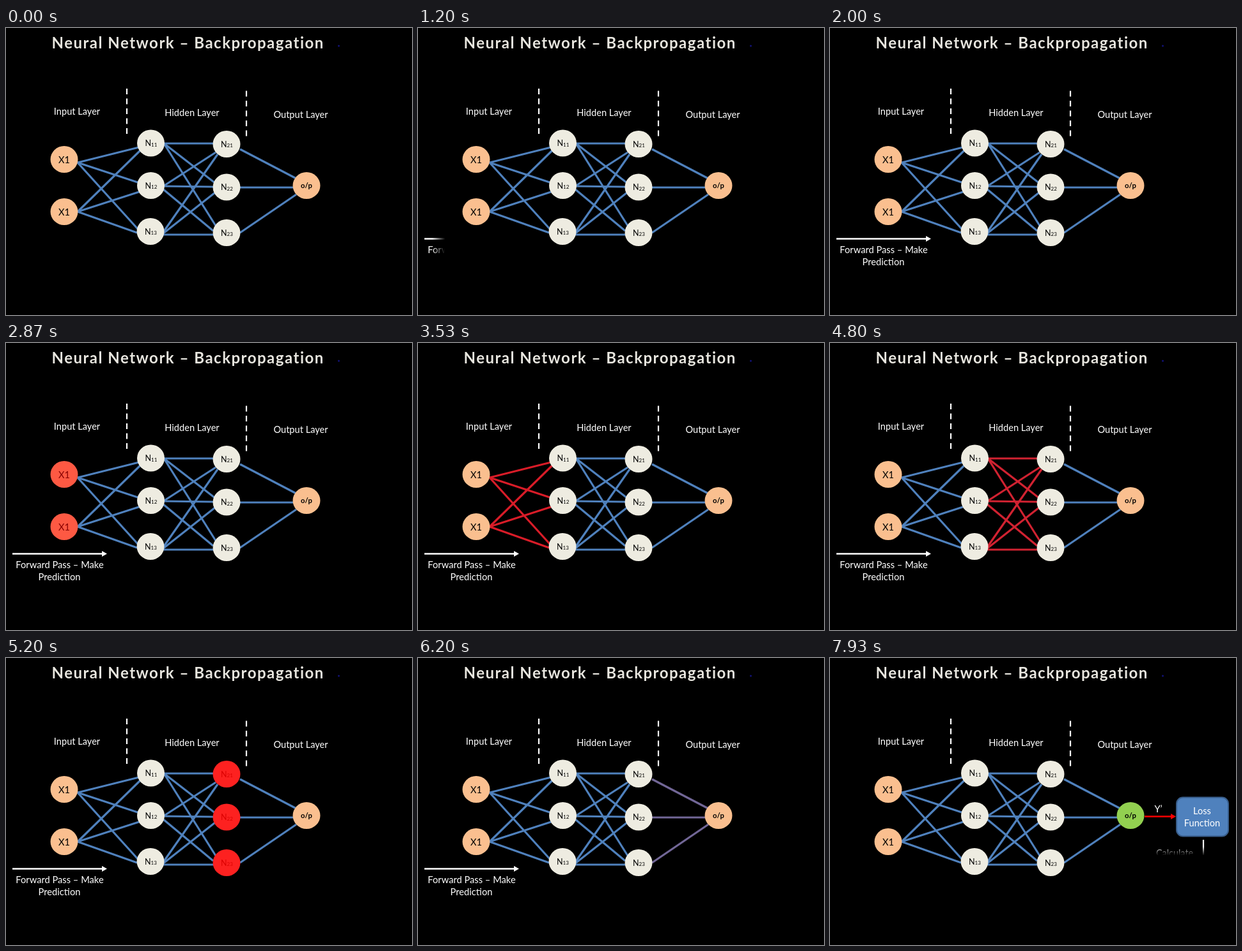
Recreate the animation shown at these times as an HTML page with a canvas. Size 635 px wide and 450 px high, loop 8 s.

```html
<!DOCTYPE html>
<html lang="en">
<head>
<meta charset="utf-8">
<title>Neural Network – Backpropagation</title>
<style>
html, body { margin: 0; width: 100%; height: 100%; overflow: hidden; background: #000; }
canvas { display: block; }
</style>
</head>
<body>
<canvas id="stage" width="635" height="450"></canvas>
<script>
const ctx = document.getElementById('stage').getContext('2d');
const LOOP = 8000, FPS = 15;
const FAMILY = 'Lato, Carlito, "Open Sans", sans-serif';

const BLUE = [79, 129, 189], RED = [255, 0, 0], BLACK = [0, 0, 0];
const ORANGE = [250, 191, 143], CREAM = [238, 236, 225], GREEN = [146, 208, 80];

// x1, y1, x2, y2 of each connection, by layer
const LINKS = [
  [[112, 211, 208, 187], [112, 211, 206, 242], [112, 211, 206, 315],
   [112, 288, 211, 191], [112, 288, 208, 257], [112, 288, 205, 321]],
  [[247, 181, 324, 181], [247, 181, 327, 243], [247, 181, 328, 310],
   [246, 248, 328, 195], [246, 248, 324, 249], [246, 253, 324, 318],
   [246, 320, 331, 198], [246, 322, 327, 258], [246, 324, 325, 324]],
  [[366, 190, 454, 236], [366, 250, 449, 250], [366, 321, 454, 261]]
];
const INPUTS = [[91, 206], [91, 288]];
const HIDDEN = [
  [[226.5, 180.5], [226.5, 247], [226, 319]],
  [[345, 182], [345, 249.5], [345, 321]]
];

const clamp = v => Math.max(0, Math.min(1, v));
const ramp = (t, start, dur) => clamp((t - start) / dur);
const pulse = (t, start) => 1 - Math.abs(2 * ramp(t, start, 500) - 1);
const mix = (a, b, k) => `rgb(${a.map((v, i) => Math.round(v + (b[i] - v) * k))})`;

function text(str, x, y, size, color = '#fff', weight = 400, align = 'center') {
  ctx.font = `${weight} ${size}px ${FAMILY}`;
  ctx.textAlign = align;
  ctx.fillStyle = color;
  ctx.fillText(str, x, y);
}

function line(x1, y1, x2, y2, color, width, dash = []) {
  ctx.strokeStyle = color;
  ctx.lineWidth = width;
  ctx.setLineDash(dash);
  ctx.beginPath();
  ctx.moveTo(x1, y1);
  ctx.lineTo(x2, y2);
  ctx.stroke();
  ctx.setLineDash([]);
}

function arrow(x1, x2, y, color) {
  line(x1, y, x2 - 7, y, color, 2.5);
  ctx.fillStyle = color;
  ctx.beginPath();
  ctx.moveTo(x2, y);
  ctx.lineTo(x2 - 8, y - 4.5);
  ctx.lineTo(x2 - 8, y + 4.5);
  ctx.fill();
}

function disc([x, y], color) {
  ctx.fillStyle = color;
  ctx.beginPath();
  ctx.ellipse(x, y, 21.5, 21, 0, 0, Math.PI * 2);
  ctx.fill();
}

function hiddenNode(pos, sub, k) {
  const [x, y] = pos, ink = mix(BLACK, RED, k);
  disc(pos, mix(CREAM, RED, k));
  text('N', x - 9, y + 4.5, 12.5, ink, 400, 'left');
  text(sub, x + 0.5, y + 5, 8, ink, 400, 'left');
}

// Hides the part of a box the soft-edged wipe has not reached yet
function wipe(x, y, w, h, p, soft, down) {
  if (p >= 1) return;
  const from = down ? y : x;
  const edge = from + p * ((down ? h : w) + soft), near = edge - soft;
  const g = down ? ctx.createLinearGradient(0, near, 0, edge)
                 : ctx.createLinearGradient(near, 0, edge, 0);
  g.addColorStop(0, 'rgba(0,0,0,0)');
  g.addColorStop(1, '#000');
  ctx.fillStyle = g;
  ctx.fillRect(x, y, w, h);
}

function heading() {
  ctx.letterSpacing = '1.5px';
  text('Neural Network – Backpropagation', 284.7, 32, 24, '#e8e6df', 700);
  ctx.letterSpacing = '0px';
  ctx.fillStyle = '#12127a';
  ctx.beginPath();
  ctx.arc(520.5, 28, 1.5, 0, Math.PI * 2);
  ctx.fill();
  text('Input Layer', 111, 136, 14.6);
  text('Hidden Layer', 291, 138, 14.6);
  text('Output Layer', 461, 140.5, 14.6);
  line(189, 95, 189, 166, '#fff', 2.2, [9, 6.5]);
  line(376, 98.5, 376, 170, '#fff', 2.2, [9, 6.5]);
}

function network(t) {
  const starts = [3230, 4485, 5750];
  LINKS.forEach((group, i) => {
    const color = mix(BLUE, RED, pulse(t, starts[i]));
    group.forEach(l => line(...l, color, 3.2));
  });
  const k = pulse(t, 2500);
  INPUTS.forEach(pos => {
    disc(pos, mix(ORANGE, RED, k));
    text('X1', pos[0], pos[1] + 5.5, 14.6, mix(BLACK, RED, k));
  });
  HIDDEN.forEach((col, i) => col.forEach((pos, j) =>
    hiddenNode(pos, `${i + 1}${j + 1}`, pulse(t, starts[i] + 500))));
  disc([470, 247], mix(ORANGE, GREEN, ramp(t, 6250, 250)));
  text('o/p', 470, 251, 11.3, '#000', 700);
}

function forwardPass(t) {
  if (t < 1000 || t > 7050) return;
  arrow(10, 158, 330.5, '#fff');
  text('Forward Pass – Make', 84, 353, 14.7);
  text('Prediction', 83.5, 372, 14.7);
  wipe(8, 322, 152, 56, ramp(t, 1000, 1000), 20);
}

function prediction(t) {
  if (t < 6430) return;
  arrow(492, 541, 248.5, '#f00');
  text('Y’', 513.5, 242, 14.6);
  wipe(492, 228, 50, 28, ramp(t, 6430, 500), 12);
}

function loss(t) {
  if (t < 7050) return;
  ctx.fillStyle = '#4f81bd';
  ctx.strokeStyle = '#385d8a';
  ctx.lineWidth = 2;
  ctx.beginPath();
  ctx.roundRect(542, 218.5, 81, 61, 10);
  ctx.fill();
  ctx.stroke();
  text('Loss', 582, 245, 14.6);
  text('Function', 582, 264, 14.6);
  if (t <= 7800) return;
  line(584, 285, 584, 340, '#fff', 2.2);
  text('Calculate', 539, 311, 14.4);
  wipe(500, 285, 125, 78, ramp(t, 7800, 500), 14, true);
}

function draw(now) {
  const frame = Math.floor((now % LOOP + 4) * FPS / 1000) % (LOOP * FPS / 1000);
  const t = frame * 1000 / FPS;
  ctx.fillStyle = '#000';
  ctx.fillRect(0, 0, 635, 450);
  heading();
  network(t);
  forwardPass(t);
  prediction(t);
  loss(t);
}

let begin;
function tick(now) {
  begin ??= now;
  draw(now - begin);
  requestAnimationFrame(tick);
}
requestAnimationFrame(tick);
</script>
</body>
</html>
```
